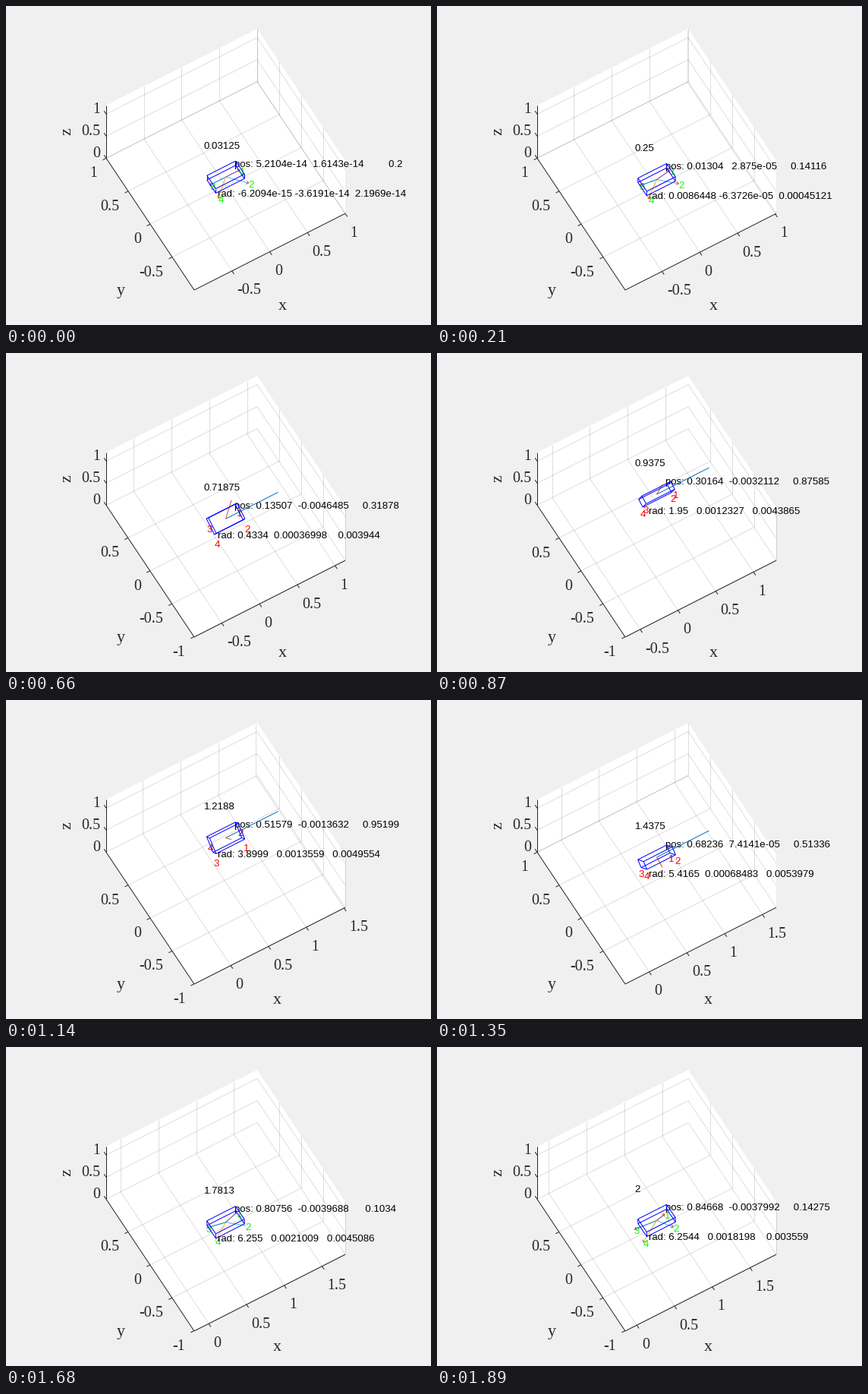
These frames come from a looping animation (560x420 px, 1920 ms). A matplotlib script:

```python
from itertools import combinations, product
from math import exp

import numpy as np
import matplotlib.pyplot as plt
from matplotlib.animation import FuncAnimation
from matplotlib.collections import LineCollection

STEPS, RATE = 64, 32
PUSH, TAKEOFF, APEX, LANDING = 20, 22, 39, 49
DAMPING = 45
PT = 0.9  # points per pixel at 80 dpi
ORIGIN = np.array([248.0, 374.0])  # screen position of the lowest floor corner
AXES = np.array([[99.5, -50.4], [-58.0, -86.8], [0.0, -58.0]])
Z_TOP = 1.2
INK = "#262626"
HALF = np.array([0.19, 0.1, 0.05])
HIPS = list(product((0.2, -0.2), (0.1, -0.1)))
LEG_COLORS = ["#7e2f8e", "#4dbeee", "#0072bd", "#edb120"]


def quad_in(u):
    return u * u


def quad_out(u):
    return u * (2 - u)


def track(start, crouch, flight, rest, ease=quad_in):
    """A coordinate that crouches, pushes off, flies freely, then settles on a line."""
    p, v, a = flight
    base, slope = rest

    def fly(step):
        s = (step - APEX) / RATE
        return p + v * s + a * s * s

    def value(step):
        if step < PUSH:
            return start + crouch * ease(max(step - 1, 0) / (PUSH - 1))
        if step < TAKEOFF:
            low = start + crouch
            return low + (fly(TAKEOFF) - low) * quad_in((step - PUSH) / (TAKEOFF - PUSH))
        if step < LANDING:
            return fly(step)
        t = (step - LANDING) / RATE
        return base + slope * t + (fly(LANDING) - base) * exp(-DAMPING * t)

    return value


x_at = track(5.2104e-14, .09607, (.515793, .76144, 0), (.76285, .17883))
y_at = track(1.6143e-14, .00021181, (-.0013632, .0065707, 0), (-.0041628, .00077577))
z_at = track(.2, -.097889, (.95199, -1.00947, -4.55178), (.05843, .17989), quad_out)
roll_at = track(-6.2094e-15, .063689, (3.8999, 6.933, 0), (6.2557, -.00274))
pitch_at = track(-3.6191e-14, -.00046949, (.00135591, -.001534, -.0070117),
                 (.00242216, -.00128503))
yaw_at = track(2.1969e-14, .0033242, (.0049554, .0020229, 0), (.00559386, -.00434103))


def speed(path, step, h=0.01):
    return (path(step) - path(step - h)) / h * RATE


def numbers(values):
    return "".join(f"{v:12.5g}" for v in values).strip()


fig = plt.figure(figsize=(7, 5.25), dpi=80, facecolor="#f0f0f0")
ax = fig.add_axes([0, 0, 1, 1])


def lines(segs, color, z=1, alpha=1):
    ax.add_collection(LineCollection(segs, colors=color, linewidths=PT,
                                     alpha=alpha, zorder=z), autolim=False)


def label(x, y, s, size=13.25, font="Liberation Sans", color="black", ha="left", **kw):
    """Text whose digits are vertically centred on y."""
    ax.text(x, y + 0.35 * size, s, fontsize=size * PT, family=font, color=color,
            ha=ha, va="baseline", zorder=2, **kw)


def serif(x, y, s, size=20, **kw):
    label(x, y, s, size, "Liberation Serif", INK, **kw)


def ticks(lo, hi):
    return [k / 2 for k in range(-4, 6) if lo <= k / 2 <= hi]


def draw_axes(cx, cy):
    x0, x1, y0, y1 = cx - 1, cx + 1, cy - 1, cy + 1

    def at(x, y, z=0):
        return ORIGIN + np.array([x - x0, y - y0, z]) @ AXES

    hull = [at(x0, y1, Z_TOP), at(x1, y1, Z_TOP), at(x1, y0, Z_TOP),
            at(x1, y0), at(x0, y0), at(x0, y1)]
    ax.fill(*zip(*hull), color="white", lw=0, zorder=0)

    out_x = -AXES[1] / np.hypot(*AXES[1]) * 5
    out_y = -AXES[0] / np.hypot(*AXES[0]) * 5
    grid = []
    marks = [(at(x0, y1), at(x0, y1, Z_TOP)), (at(x0, y1), at(x0, y0)),
             (at(x0, y0), at(x1, y0))]
    xs = ticks(x0, x1)
    for v in xs:
        p = at(v, y0)
        grid += [(p, at(v, y1)), (at(v, y1), at(v, y1, Z_TOP))]
        marks.append((p, p + out_x))
        serif(p[0] + 6.5, p[1] + 23.5, f"{v:g}")
    for v in ticks(y0, y1):
        p = at(x0, v)
        grid += [(p, at(x1, v)), (at(x1, v), at(x1, v, Z_TOP))]
        marks.append((p, p + out_y))
        serif(p[0] - 11.5, p[1] + 18, f"{v:g}", ha="right")
    for v in ticks(0, Z_TOP):
        p = at(x0, y1, v)
        grid += [(p, at(x1, y1, v)), (at(x1, y1, v), at(x1, y0, v))]
        marks.append((p, p - out_x))
        serif(p[0] - 8, p[1] - 8.5, f"{v:g}", ha="right")
    lines(grid, INK, alpha=0.15)
    lines(marks, INK)

    serif(364 if xs[0] < 0 else 357, 392.5, "x", 22, ha="center")
    serif(151, 372, "y", 22, ha="center")
    ax.text(85.5, 165.5, "z", fontsize=22 * PT, family="Liberation Serif", color=INK,
            rotation=90, rotation_mode="anchor", ha="center", va="baseline")


def draw_robot(step, x, z, roll):
    centre = ORIGIN + np.array([1, 1, z]) @ AXES
    c, s = np.cos(roll), np.sin(roll)

    def local(px, py, pz=0):
        return centre + np.array([px, c * py - s * pz, s * py + c * pz]) @ AXES

    corners = product((-1, 1), repeat=3)
    edges = [(local(*HALF * a), local(*HALF * b)) for a, b in combinations(corners, 2)
             if sum(i != j for i, j in zip(a, b)) == 1]

    airborne = TAKEOFF <= step < LANDING
    # Planted feet stay put in the world while the body moves over them.
    stance = 0 if airborne else (0.045 if step < TAKEOFF else 0.81) - x
    drop = 0.2 if airborne else z
    for i, hip in enumerate(HIPS):
        foot = local(*hip) + np.array([stance, 0, -drop]) @ AXES
        label(foot[0] - 0.2, foot[1] + 1.2, str(i + 1), color="red" if airborne else "lime")
        if airborne:
            continue
        lines([(centre, foot)], LEG_COLORS[i], 3)
        if z > 0.125:
            d = 3 * (foot - centre) / np.hypot(*(foot - centre))
            side = 0.7 * np.array([-d[1], d[0]])
            lines([(foot, foot - d + side), (foot, foot - d - side)], "#d95319", 3)

    spin = np.array([speed(roll_at, step), 0, 0])
    velocity = np.array([speed(x_at, step), 0, speed(z_at, step)])
    for vec, color in ((spin, "#0072bd"), (velocity, "#d95319")):
        lines([(centre, centre + 0.1 * vec @ AXES)], color, 3)
    lines(edges, "blue", 4)
    return centre[1]


def draw(frame):
    step = frame + 1
    ax.clear()
    ax.set(xlim=(0, 560), ylim=(420, 0))
    ax.axis("off")

    x, y, z = (path(step) for path in (x_at, y_at, z_at))
    angles = [path(step) for path in (roll_at, pitch_at, yaw_at)]

    draw_axes(x, y)
    mid = draw_robot(step, x, z, angles[0])
    label(260.5, mid - 42, f"{step / RATE + 1e-9:.5g}")
    label(301, mid - 18, "pos: " + numbers((x, y, z)))
    label(279, mid + 20.9, "rad: " + numbers(angles))
    return []


anim = FuncAnimation(fig, draw, frames=STEPS, init_func=lambda: [],
                     interval=1920 / STEPS, repeat=True, repeat_delay=0)
plt.show()
```
